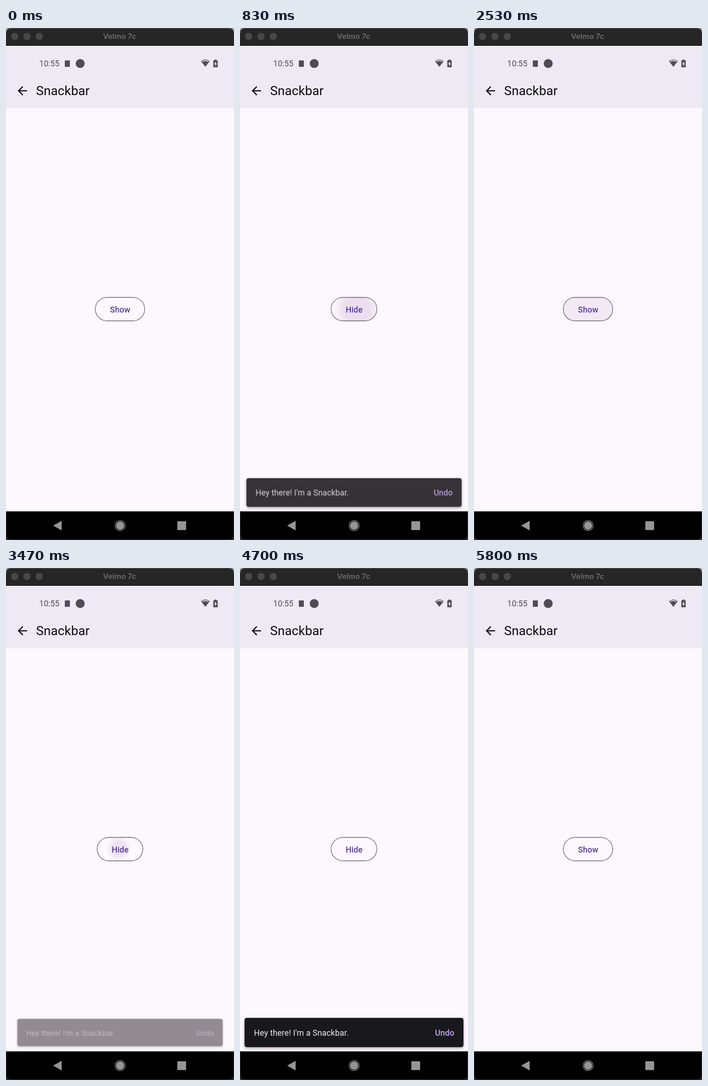
Write an HTML page that moves like this. It is 500 px wide and 1121 px high and loops after 5.83 s.

```html
<!DOCTYPE html>
<html lang="en">
<head>
<meta charset="utf-8">
<title>Snackbar</title>
<style>
  :root { --loop: 5.83s; }
  html, body { margin: 0; width: 100%; height: 100%; overflow: hidden; }
  body { position: relative; background: #fdf8fe; font-family: Roboto, sans-serif; }
  svg { position: absolute; left: 0; top: 0; display: block; }

  .button {
    position: absolute; left: 195px; top: 589px; width: 110px; height: 53px;
    border-radius: 27px; overflow: hidden; color: #573d99;
    font-weight: 500; font-size: 17.8px; line-height: 55px; text-align: center;
    animation: button var(--loop) step-end infinite;
  }
  .button::after {
    content: ""; position: absolute; inset: 0; border-radius: inherit;
    box-shadow: inset 0 0 0 1.4px #625c67;
  }
  .label { position: absolute; left: .6px; right: 0; top: 0; letter-spacing: .13px; }
  .show { animation: showLabel var(--loop) step-end infinite; }
  .hide { opacity: 0; animation: hideLabel var(--loop) step-end infinite; }

  .ripple {
    position: absolute; left: calc(50% + var(--x)); top: calc(50% + var(--y));
    width: 244px; height: 244px; margin: -122px; opacity: 0;
    background: radial-gradient(closest-side, rgba(150, 90, 160, .16) 55%, rgba(150, 90, 160, 0));
    animation: ripple var(--loop) linear var(--at) infinite;
  }

  .snack {
    position: absolute; left: 10px; top: 985px; width: 480px; height: 64px;
    border-radius: 5px; background: #19181c; opacity: 0;
    box-shadow: 0 3px 6px rgba(60, 30, 60, .34), 0 0 2px rgba(30, 10, 30, .35);
    font-size: 17.8px; line-height: 65px; color: #f1ecf3;
    animation: fade var(--loop) linear infinite, grow var(--loop) linear infinite;
  }
  .snack span {
    position: absolute; top: 0; white-space: nowrap;
    animation: fade var(--loop) linear infinite;
  }
  .text { left: 20.6px; letter-spacing: .16px; }
  .undo { right: 20px; font-weight: 500; color: #bfa3f3; letter-spacing: .13px; }

  @keyframes button {
    0%, 35.16%, 84.91%, 100% { left: 195px; width: 110px; }
    12.01%, 58.66% { left: 199px; width: 102px; }
  }
  @keyframes showLabel {
    0%, 35.16%, 84.91%, 100% { opacity: 1; }
    12.01%, 58.66% { opacity: 0; }
  }
  @keyframes hideLabel {
    0%, 35.16%, 84.91%, 100% { opacity: 0; }
    12.01%, 58.66% { opacity: 1; }
  }
  @keyframes ripple {
    0% { opacity: 0; transform: scale(0); }
    2.01% { opacity: 1; }
    6.17% { opacity: 1; }
    7.72% { opacity: .83; transform: scale(1); }
    14.15%, 100% { opacity: 0; transform: scale(1); }
  }
  @keyframes fade {
    0%, 36.88%, 86.79%, 100% { opacity: 0; }
    12.01%, 58.66% { opacity: 0; animation-timing-function: cubic-bezier(0, .1, .5, 1); }
    15.44%, 35.16%, 62.09%, 84.91% { opacity: 1; }
  }
  @keyframes grow {
    0%, 36.9%, 86.8%, 100% { transform: scale(.9); background: #190410; }
    12.01%, 58.66% { transform: scale(.9); background: #190410; animation-timing-function: ease-out; }
    15.44%, 36.89%, 62.09%, 86.79% { transform: none; background: #19181c; }
  }
</style>
</head>
<body>
<div class="button">
  <div class="ripple" style="--at:.64s; --x:6px; --y:0px"></div>
  <div class="ripple" style="--at:1.96s; --x:4px; --y:0px"></div>
  <div class="ripple" style="--at:3.37s; --x:-3px; --y:-2px"></div>
  <div class="ripple" style="--at:4.88s; --x:2px; --y:0px"></div>
  <span class="label show">Show</span>
  <span class="label hide">Hide</span>
</div>

<div class="snack">
  <span class="text">Hey there! I'm a Snackbar.</span>
  <span class="undo">Undo</span>
</div>

<svg width="500" height="1121" viewBox="0 0 500 1121">
  <!-- window title -->
  <path fill="#b4b4ba" d="M0 0H500V12H0z"/>
  <path fill="#262626" d="M0 39V11Q0 0 11 0H489Q500 0 500 11V39z"/>
  <path fill="none" stroke="#626264" d="M.5 12Q.5 .5 12 .5H488Q499.5 .5 499.5 12"/>
  <path fill="#050505" d="M0 38H500V39H0z"/>
  <g fill="#474747">
    <circle cx="19" cy="18.5" r="8"/>
    <circle cx="46" cy="18.5" r="8"/>
    <circle cx="73" cy="18.5" r="8"/>
  </g>
  <text x="249" y="24" text-anchor="middle" font-family="Inter, sans-serif" font-weight="700" font-size="16.5" fill="#656565">Velmo 7c</text>

  <!-- app bar -->
  <path fill="#efe9f4" d="M0 39H500V174H0z"/>
  <path fill="#faf7fc" d="M0 39H500V41H0z"/>
  <path fill="#e6e0ea" d="M0 173.5H500V174.5H0z"/>
  <path fill="#f5f0f7" d="M0 174.5H500V176H0z"/>
  <g fill="#514b57">
    <text x="73" y="83.5" font-size="17.5" letter-spacing=".1">10:55</text>
    <rect x="129" y="71" width="11" height="14"/>
    <circle cx="162.7" cy="77.7" r="9.8"/>
    <path d="M427.8 73Q437.2 65.2 446.6 73L437.2 85z"/>
    <path d="M457 69.3H462V71H464.3V86H454.6V71H457z"/>
  </g>
  <path fill="none" stroke="#efe9f4" stroke-width="1.8" d="M430.6 73.6Q437.2 68.9 443.8 73.6"/>
  <path fill="#efe9f4" d="M460.3 73L456.6 79.2H458.9V83.8L462.4 77.7H460.3z"/>
  <path fill="#0b0a0d" transform="translate(20.7 122.2) scale(1.273)" d="M20 11H7.83l5.59-5.59L12 4l-8 8 8 8 1.41-1.41L7.83 13H20z"/>
  <text x="66" y="147" font-size="28" letter-spacing=".1" fill="#0b0a0d">Snackbar</text>

  <!-- navigation -->
  <path fill="#2b2b2d" d="M0 1058.5H500V1121H0z"/>
  <path fill="#000" d="M0 1058.5H500V1109Q500 1121 488 1121H12Q0 1121 0 1109z"/>
  <path fill="none" stroke="#3a3a3a" d="M.5 1059V1109Q.5 1120.5 12 1120.5H488Q499.5 1120.5 499.5 1109V1059"/>
  <g fill="#959595">
    <path d="M103.5 1089.5L122 1079V1100z"/>
    <circle cx="250.3" cy="1089.5" r="9"/>
    <circle cx="250.3" cy="1089.5" r="10.9" fill="none" stroke="#959595" stroke-width="1.2"/>
    <rect x="375.7" y="1080" width="19.3" height="19.3" rx="1.5"/>
  </g>
</svg>
</body>
</html>
```
